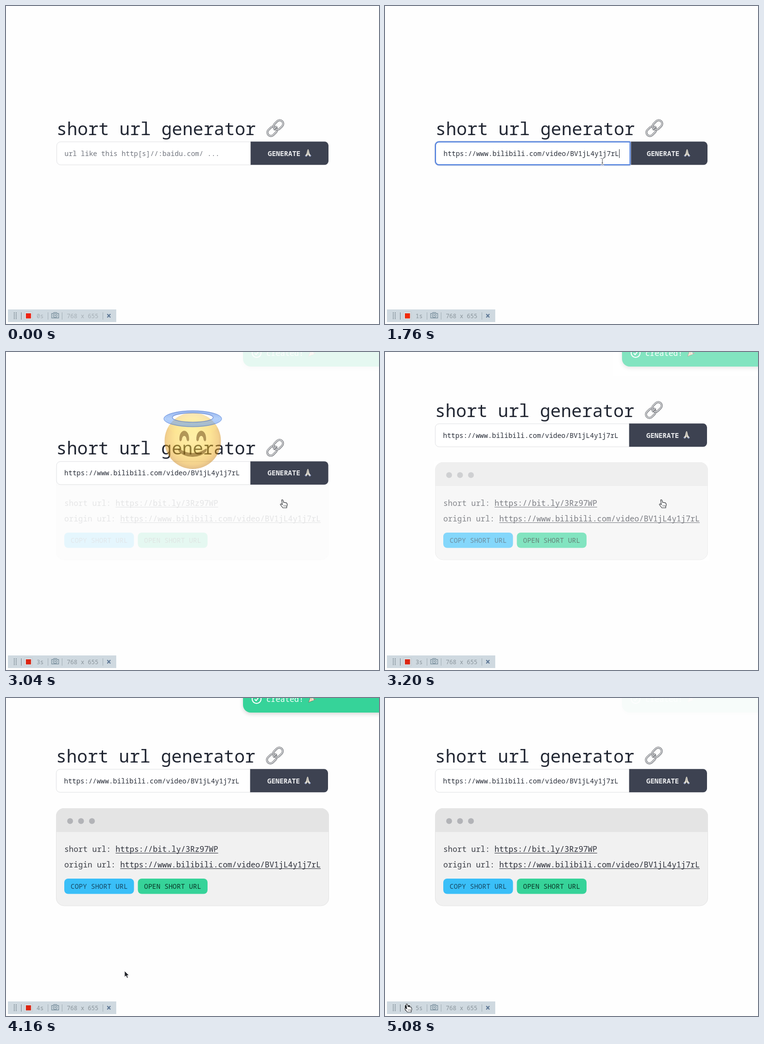
An HTML page with a canvas for the animation above (5.12 s loop, 768 by 655 pixels).

```html
<!DOCTYPE html>
<html lang="en">
<head>
<meta charset="utf-8">
<title>short url generator</title>
<style>
html, body { margin: 0; width: 100%; height: 100%; overflow: hidden; background: #fefefe; }
canvas { display: block; }
</style>
</head>
<body>
<canvas id="stage" width="768" height="655"></canvas>
<script>
const c = document.getElementById('stage').getContext('2d');
const LOOP = 5120, STEP = 40, BG = '#fefefe', INK = '#222733';
const MONO = '"Noto Sans Mono", "DejaVu Sans Mono", monospace';
const LONG_URL = 'https://www.bilibili.com/video/BV1jL4y1j7rL';
const HINT = 'url like this http[s]//:baidu.com/ ...';

// pointer path: time, x, y
const PATH = [
  [0, 46, 636], [120, 80, 590], [320, 190, 410], [560, 254, 322], [880, 256, 318],
  [1520, 256, 318], [1760, 447, 320], [1920, 538, 312], [2040, 569, 305],
  [3520, 569, 305], [3760, 420, 420], [4040, 252, 548], [4160, 244, 562],
  [4600, 150, 598], [4920, 60, 628], [5040, 45, 631], [5120, 45, 631]
];

const ramp = (t, a, b) => Math.min(1, Math.max(0, (t - a) / (b - a)));

function text(str, x, y, size, color, weight = 400) {
  c.font = `${weight} ${size}px ${MONO}`;
  c.fillStyle = color;
  c.fillText(str, x, y);
}

function box(x, y, w, h, r, fill, stroke, line = 1) {
  c.beginPath();
  c.roundRect(x, y, w, h, r);
  if (fill) { c.fillStyle = fill; c.fill(); }
  if (stroke) { c.strokeStyle = stroke; c.lineWidth = line; c.stroke(); }
}

function oval(x, y, rx, ry, fill, stroke, line = 1) {
  c.beginPath();
  c.ellipse(x, y, rx, ry, 0, 0, Math.PI * 2);
  if (fill) { c.fillStyle = fill; c.fill(); }
  if (stroke) { c.strokeStyle = stroke; c.lineWidth = line; c.stroke(); }
}

function shape(d, fill, stroke, line = 1) {
  const p = new Path2D(d);
  if (fill) { c.fillStyle = fill; c.fill(p); }
  if (stroke) { c.strokeStyle = stroke; c.lineWidth = line; c.stroke(p); }
}

function at(x, y, draw) {
  c.save();
  c.translate(x, y);
  draw();
  c.restore();
}

// fades what is already painted into the page colour
function veil(x, y, w, h, shown) {
  c.globalAlpha = 1 - shown;
  c.fillStyle = BG;
  c.fillRect(x, y, w, h);
  c.globalAlpha = 1;
}

function link(x, y) {
  at(x, y, () => {
    c.rotate(-Math.PI / 4);
    for (const cx of [-9, 9]) {
      box(cx - 11, -7.2, 22, 14.4, 7.2, null, '#66686c', 4);
      box(cx - 11, -7.2, 22, 14.4, 7.2, null, '#b0b2b6', 2.6);
      box(cx - 11, -7.7, 22, 14.4, 7.2, null, '#e2e3e5', 1);
    }
    shape('M-5 0H5', null, '#77797d', 4);
    shape('M-5 -.5H5', null, '#d2d3d6', 1.8);
  });
}

function hands(x, y) {
  at(x, y, () => {
    shape('M0 -8C2 -7 2 -2 3 1L6 5L3 7L0 3L-3 7L-6 5L-3 1C-2 -2 -2 -7 0 -8Z', '#e2ded2');
    shape('M-6 4.5L-3.5 7M6 4.5L3.5 7', null, '#9aa9d2', 2);
    shape('M0 -6V3', null, '#85827c', .8);
  });
}

function angel(alpha) {
  if (!alpha) return;
  c.save();
  c.globalAlpha = alpha;
  const skin = c.createRadialGradient(384, 166, 8, 384, 181, 61);
  skin.addColorStop(0, '#ffe252');
  skin.addColorStop(.55, '#fbc92e');
  skin.addColorStop(.85, '#e9a51c');
  skin.addColorStop(1, '#c47c14');
  oval(384.5, 183, 58, 58, skin);
  const glow = c.createLinearGradient(0, 125, 0, 176);
  glow.addColorStop(0, 'rgba(255,253,232,.95)');
  glow.addColorStop(.45, 'rgba(255,244,175,.75)');
  glow.addColorStop(1, 'rgba(255,230,100,0)');
  c.save();
  c.clip();
  oval(384.5, 149, 52, 26, glow);
  c.restore();
  const ring = c.createLinearGradient(0, 120, 0, 155);
  ring.addColorStop(0, '#3063d0');
  ring.addColorStop(.5, '#6ea5f7');
  ring.addColorStop(1, '#467ee6');
  c.beginPath();
  c.ellipse(384.5, 137.5, 60, 17, 0, 0, Math.PI * 2);
  c.ellipse(384.5, 135, 42, 9.5, 0, 0, Math.PI * 2);
  c.fillStyle = ring;
  c.fill('evenodd');
  oval(384.5, 137.5, 59.5, 16.5, null, '#3162cc');
  oval(384.5, 135, 42, 9.5, null, '#2c59bf', 1.5);
  oval(384.5, 137, 54, 13, null, 'rgba(155,200,255,.6)', 2);
  for (const x of [367, 402]) {
    shape(`M${x - 10} 181C${x - 11} 156 ${x + 11} 156 ${x + 10} 181Q${x + 8} 187 ${x + 5} 181C${x + 4} 170 ${x - 4} 170 ${x - 5} 181Q${x - 8} 187 ${x - 10} 181Z`, '#65420f');
  }
  shape('M356 199Q384 217 412 199Q415 200 412 205Q402 216 384 216Q366 216 356 205Q353 200 356 199Z', '#65420f');
  c.restore();
}

function card(shown) {
  if (!shown) return;
  c.save();
  c.beginPath();
  c.roundRect(103, 227, 562, 201, 16);
  c.clip();
  c.fillStyle = '#f1f1f1';
  c.fillRect(103, 227, 562, 201);
  c.fillStyle = '#e4e4e4';
  c.fillRect(103, 227, 562, 49);
  c.restore();
  box(103.5, 227.5, 561, 200.5, 16, null, '#e4e4e4');
  for (let i = 0; i < 3; i++) oval(132 + i * 22.5, 253.5, 6, 6, '#b2b3b7');
  const row = (label, url, y) => {
    text(label, 120, y, 16, '#3b3e46');
    const x = 120 + c.measureText(label).width;
    text(url, x, y, 16, '#2b2e38');
    c.fillRect(x, y + 2, c.measureText(url).width, 1);
  };
  row('short url: ', 'https://bit.ly/3Rz97WP', 317);
  row('origin url: ', LONG_URL, 349);
  box(120, 372, 143.5, 31.5, 8, '#3abff8');
  box(271.5, 372, 143.5, 31.5, 8, '#36d399');
  text('COPY SHORT URL', 133, 392.5, 14, '#174a66', 500);
  text('OPEN SHORT URL', 284.3, 392.5, 14, '#0b3b2a', 500);
  veil(101, 225, 566, 206, shown);
}

function toast(shown) {
  if (!shown) return;
  c.save();
  c.shadowColor = 'rgba(0,0,0,.16)';
  c.shadowBlur = 9;
  c.shadowOffsetY = 3;
  box(488, -34, 300, 64, 16, '#36d399');
  c.restore();
  oval(516, 2, 9.2, 9.2, null, '#fff', 2);
  shape('M512 2.5L515 5.5L520 -1', null, '#fff', 2);
  text('created!', 536, 8, 16, '#fff');
  at(629, 2, () => {
    shape('M-6 7L-2 -4L4 3Z', '#f0d9b8', '#7d6660', .8);
    shape('M-1 -3Q4 -2 3 3', null, '#fff2e4', 2);
    shape('M2 -2L6 -5M4 1H8', null, '#e2607c', 1.6);
  });
  veil(470, 0, 298, 50, shown);
}

function form(t, move) {
  const focus = t < 2120 ? ramp(t, 600, 760) : 0;
  const pasted = t >= 1320;
  const hover = t >= 1900 && t < 3000;
  at(-move, -133 * move, () => {
    text('short url generator', 104, 265.5, 36, INK);
    link(554.5, 251.5);
    box(104.5, 279.8, 400, 47.4, [8, 0, 0, 8], '#fff', '#dfe0e3');
    box(503.6, 279.3, 160.4, 48, [0, 8, 8, 0], hover ? '#303340' : '#3d4251');
    if (focus) {
      c.globalAlpha = focus;
      box(102.5, 278.5, 403, 50, [9, 2, 2, 9], null, '#cbd3e8', 2);
      box(104, 280, 400.5, 47, [7, 1, 1, 7], '#fff', '#487bdd', 2);
      c.globalAlpha = 1;
    }
    if (pasted) text(LONG_URL, 120.5, 308.5, 14, '#2a2f3a');
    else text(HINT, 120.5, 308.5, 14, '#71757e');
    const caret = (t >= 640 && t < 1080) || (t >= 1320 && t < 1840);
    if (caret) {
      c.fillStyle = '#30343d';
      c.fillRect(pasted ? 482 : 121, 295, 1, 18);
    }
    text('GENERATE', 539, 308.5, 14, '#eeeff1', 600);
    hands(622, 303);
  });
}

function recordColor(t) {
  if (t >= 5000) return '#24282b';
  if (t >= 3000) return '#dc2512';
  if (t >= 2120) return '#d95d08';
  if (t >= 1080) return '#f02a0a';
  return t >= 640 ? '#b32a20' : '#ee2414';
}

function recorder(t) {
  c.fillStyle = '#cfd9e0';
  c.fillRect(4, 625, 223, 26);
  c.fillStyle = '#7f8d97';
  for (let i = 0; i < 10; i++) c.fillRect(16 + (i % 2) * 4, 631 + (i >> 1) * 3, 2, 1.6);
  c.fillStyle = '#75818a';
  c.fillRect(31, 631, 1, 15);
  c.fillStyle = '#a3afb7';
  for (const x of [86, 115, 199]) c.fillRect(x, 631, 1, 15);
  box(37.5, 629.5, 17, 17, 2, '#d6dee3', '#c0cad1');
  c.fillStyle = recordColor(t);
  c.fillRect(41, 633, 10.5, 10.5);
  const pale = t < 160 ? '#a5afb6' : '#89949b';
  text(Math.floor((t + 200) / 1000) + 's', 63, 642.5, 12, pale);
  text('768 x 655', 125.3, 642.5, 12, pale);
  shape('M94 633.5H97L98.5 631.5H104L105.5 633.5H108.5V642.5H94Z', null, '#7c929f', 1.3);
  oval(101.2, 637.7, 3.8, 3.8, null, '#7c929f', 1.4);
  oval(101.2, 637.7, 1.4, 1.4, '#7c929f');
  shape('M208.5 634.5L215 641.5M215 634.5L208.5 641.5', null, '#5d7795', 2);
}

function pointer(t) {
  if (t < 40) return;
  const i = PATH.findIndex(k => k[0] > t);
  const [t0, x0, y0] = PATH[i - 1], [t1, x1, y1] = PATH[i];
  const k = ramp(t, t0, t1);
  const x = x0 + (x1 - x0) * k, y = y0 + (y1 - y0) * k;
  const inField = t < 3000 && x > 104 && x < 504 && y > 280 && y < 328;
  const onButton = t > 1800 && t <= 3520 && x >= 504;
  at(x, y, () => {
    c.lineJoin = 'round';
    if (inField) {
      const beam = 'M-3 -6.5Q0 -6.5 .5 -5Q1 -6.5 4 -6.5M.5 -5V5M-3 6.5Q0 6.5 .5 5Q1 6.5 4 6.5M-1 2.5H2';
      shape(beam, null, '#fff', 2.4);
      shape(beam, null, '#5a5d62', 1);
    } else if (onButton || t >= 5000 || t < 100) {
      shape('M-1.5 0Q0 -1.5 1.2 0L2.5 5L4.5 4.5L6 5.5L8 5.3L9.5 7Q11 11 9 13V16H1L-4 9.5Q-4.5 7.5 -2 8L0 9.5Z', '#fff', '#33363b', 1.2);
      shape('M3 10V13.5M5.3 10V13.5M7.5 10V13.5', null, '#55585d', .8);
    } else {
      shape('M0 0V13L3 10.2L5 15L7.5 14L5.5 9.5H9.5Z', '#23252b', '#fff', 1);
    }
  });
}

function draw(t) {
  c.fillStyle = BG;
  c.fillRect(0, 0, 768, 655);
  const shown = ramp(t, 3000, 3320);
  const move = t < 3000 ? 0 : 1 - (1 - ramp(t, 3000, 3250)) ** 3;
  card(shown);
  form(t, move);
  angel(ramp(t, 2100, 2440) * (1 - ramp(t, 2960, 3120)));
  toast(shown * (1 - ramp(t, 4860, 5088)));
  recorder(t);
  pointer(t);
}

const start = performance.now();
function tick() {
  const t = (performance.now() - start) % LOOP;
  draw(Math.floor(t / STEP) * STEP);
  requestAnimationFrame(tick);
}
tick();
</script>
</body>
</html>
```
